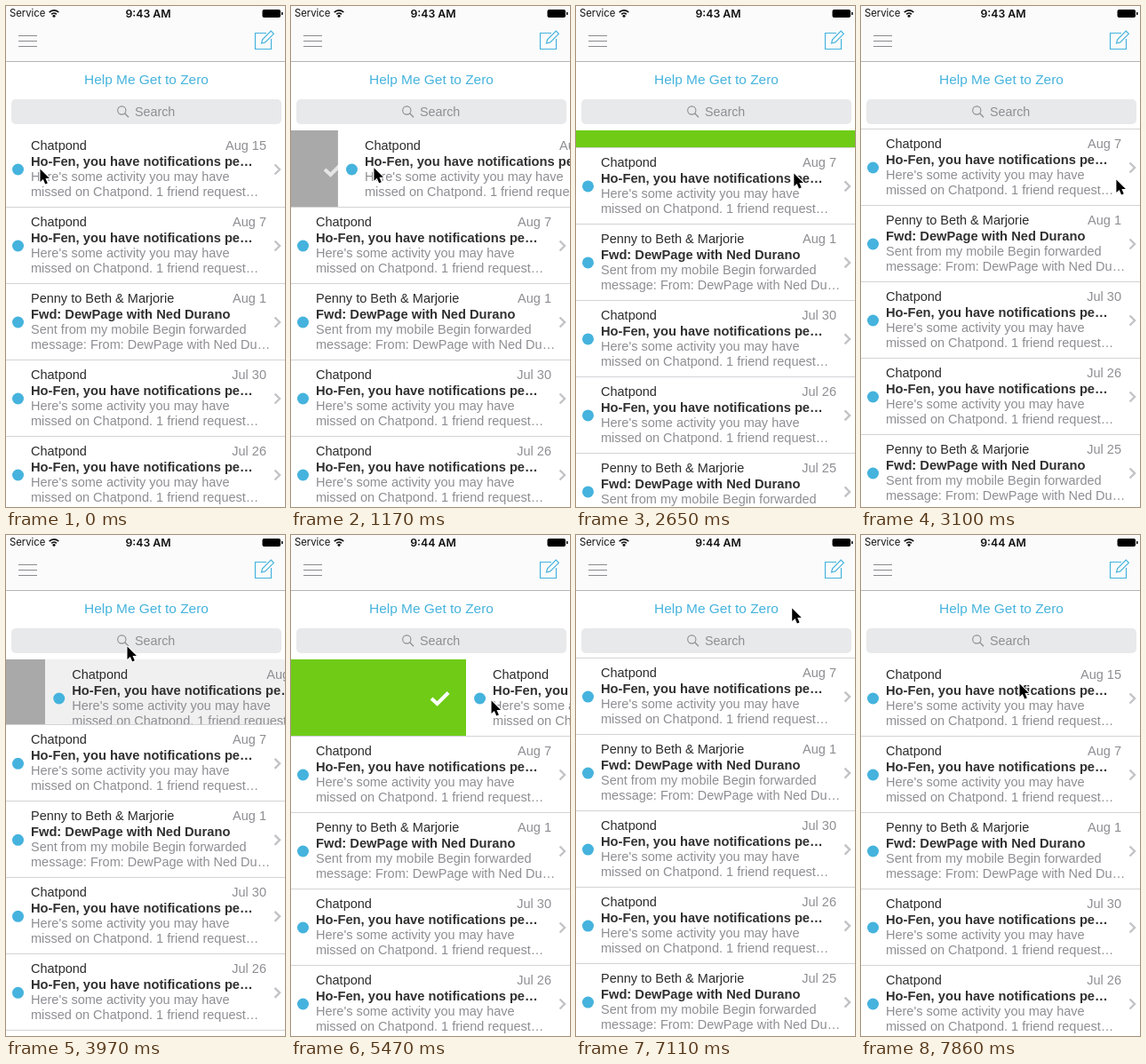
Write an HTML page with a canvas that moves like this. It is 314 px wide and 564 px high and loops after 8000 ms.

```html
<!DOCTYPE html>
<html lang="en">
<head>
<meta charset="utf-8">
<title>Inbox swipe</title>
<style>
  html, body { margin: 0; width: 100%; height: 100%; overflow: hidden; background: #fff; }
  canvas { display: block; width: 314px; height: 564px; }
</style>
</head>
<body>
<canvas id="stage"></canvas>
<script>
const W = 314, H = 564, LOOP = 8000, TOP = 140, ROW = 86;
const BLUE = '#45b3dd', GREY = '#8e8e93', LINE = '#d3d3d6';
const SANS = '"Liberation Sans", Arial, sans-serif';
const UI = 'Inter, Roboto, sans-serif';

const canvas = document.getElementById('stage');
const ctx = canvas.getContext('2d');
const dpr = window.devicePixelRatio || 1;
canvas.width = W * dpr;
canvas.height = H * dpr;

const notice = {
  from: 'Chatpond',
  subject: 'Ho-Fen, you have notifications pe…',
  body: ["Here's some activity you may have", 'missed on Chatpond. 1 friend request…']
};
const forward = {
  from: 'Penny to Beth & Marjorie',
  subject: 'Fwd: DewPage with Ned Durano',
  body: ['Sent from my mobile Begin forwarded', 'message: From: DewPage with Ned Du…']
};
const mails = [
  [notice, 'Aug 15'], [notice, 'Aug 7'], [forward, 'Aug 1'],
  [notice, 'Jul 30'], [notice, 'Jul 26'], [forward, 'Jul 25']
];

// Time, then value(s); linear between entries.
const dragKeys = [
  [0, 0], [290, 4], [2050, 126], [2200, 165], [2370, 316],
  [4720, 0], [5462, 199], [5760, 234], [5910, 246], [6353, 288], [6440, 316]
];
const cursorKeys = [
  [0, 38, 183], [290, 42, 183], [2050, 164, 180], [2200, 203, 181], [3074, 287, 195],
  [3530, 165, 58], [3660, 140, 46], [3953, 136, 125], [4250, 26, 187],
  [4720, 26, 187], [5462, 225, 186], [6353, 315, 184], [6810, 322, 160],
  [7250, 200, 40], [7390, 185, 20], [7540, 182, 32], [7838, 178, 167]
];

// Each swipe: start, collapse and undo times.
const swipes = [
  { start: 0, collapse: 2370, undo: 3583 },
  { start: 4720, collapse: 6430, undo: 7180 }
];

const clamp = (v, a = 0, b = 1) => Math.min(b, Math.max(a, v));

function sample(keys, t, col = 1) {
  const i = keys.findIndex(k => k[0] > t);
  if (i < 0) return keys[keys.length - 1][col];
  if (i === 0) return keys[0][col];
  const a = keys[i - 1], b = keys[i];
  return a[col] + (b[col] - a[col]) * (t - a[0]) / (b[0] - a[0]);
}

// The screen refreshes about seven times a second.
function stepTime(t) {
  return t < 4720
    ? Math.floor(t / 146.4) * 146.4
    : 4720 + Math.floor((t - 4720) / 148.5) * 148.5;
}

function rowState(t) {
  const s = swipes[t < 4720 ? 0 : 1];
  if (t >= s.undo) {
    const rest = 1 - clamp((t - s.undo) / 600);
    return { x: 314 * rest * rest, h: ROW * (1 - rest * rest), undo: rest };
  }
  if (t >= s.collapse) {
    const p = (t - s.collapse) / 500;
    const h = p < 1 ? ROW * (1 - p) ** 2 : -2 * Math.sin(Math.PI * clamp((p - 1) / 0.8));
    return { x: 316, h, undo: -1 };
  }
  return { x: sample(dragKeys, t), h: ROW, undo: -1 };
}

function text(str, x, y, font, color, align = 'left') {
  ctx.font = font;
  ctx.fillStyle = color;
  ctx.textAlign = align;
  ctx.fillText(str, x, y);
}

function rect(x, y, w, h, color) {
  ctx.fillStyle = color;
  ctx.fillRect(x, y, w, h);
}

function path(points, color, width, closed) {
  ctx.beginPath();
  points.forEach(([x, y]) => ctx.lineTo(x, y));
  if (closed) ctx.closePath();
  ctx.strokeStyle = color;
  ctx.lineWidth = width;
  ctx.stroke();
}

function disc(x, y, r, color) {
  ctx.beginPath();
  ctx.arc(x, y, r, 0, 7);
  ctx.fillStyle = color;
  ctx.fill();
}

function statusBar(t) {
  text('Service', 4, 12, '11.3px ' + UI, '#111');
  ctx.strokeStyle = '#111';
  ctx.lineWidth = 1.7;
  for (const r of [3.8, 7.2]) {
    ctx.beginPath();
    ctx.arc(54, 12, r, -Math.PI * 0.76, -Math.PI * 0.24);
    ctx.stroke();
  }
  disc(54, 11.3, 1.5, '#111');
  text(t < 5000 ? '9:43 AM' : '9:44 AM', 160, 12.5, '600 12.3px ' + UI, '#111', 'center');
  ctx.beginPath();
  ctx.roundRect(288.5, 4, 20.5, 9, 2);
  ctx.fillStyle = '#000';
  ctx.fill();
  rect(310, 7, 1.5, 3, '#000');
}

function header(t) {
  rect(0, 0, W, 62, '#fbfbfb');
  rect(0, 62, W, 1, '#b4b4b6');
  statusBar(t);
  for (const y of [33, 39, 45]) rect(14, y, 21, 1, '#8b8b8f');
  path([[293, 30.5], [280.5, 30.5], [280.5, 48.5], [298.5, 48.5], [298.5, 37]], BLUE, 1.2);
  path([[287.5, 42], [288.6, 37.8], [298.2, 28.2], [301.3, 31.3], [291.7, 40.9]], BLUE, 1.2, true);

  text('Help Me Get to Zero', 158, 88, '15.45px ' + SANS, BLUE, 'center');
  ctx.beginPath();
  ctx.roundRect(6, 105, 304, 28, 5);
  ctx.fillStyle = '#e8e9eb';
  ctx.fill();
  ctx.beginPath();
  ctx.arc(130.3, 117.5, 4.6, 0, 7);
  ctx.strokeStyle = GREY;
  ctx.lineWidth = 1.1;
  ctx.stroke();
  path([[133.6, 120.8], [138, 125.2]], GREY, 1.3);
  text('Search', 145, 124, '14.3px ' + SANS, GREY);
}

function mailRow([mail, date], x, y) {
  disc(x + 13.5, y + 44, 6.5, BLUE);
  text(mail.from, x + 28, y + 22, '14.5px ' + SANS, '#2b2b2b');
  text(date, x + 293, y + 22, '14.5px ' + SANS, GREY, 'right');
  text(mail.subject, x + 28, y + 40, 'bold 14.7px ' + SANS, '#303030');
  mail.body.forEach((line, i) =>
    text(line, x + 28, y + 57 + 17 * i, '14.5px ' + SANS, GREY));
  path([[x + 302.5, y + 38.5], [x + 308, y + 44], [x + 302.5, y + 49.5]], '#c3c3c7', 2.4);
}

function swipePanel(row, t) {
  const isRed = t > 4720 && row.x >= 235;
  const isGrey = row.undo >= 0 || row.x < 79;
  rect(0, TOP, row.x - 2, ROW, isGrey ? '#a9a9a9' : isRed ? '#ff0000' : '#70cb17');
  if (row.undo >= 0) return;

  const cx = Math.max(row.x, 79) - 31.5, cy = TOP + 44;
  ctx.globalAlpha = clamp(row.x / 79);
  if (isRed) {
    path([[cx - 8, cy - 8], [cx + 8, cy + 8]], '#fff', 4);
    path([[cx + 8, cy - 8], [cx - 8, cy + 8]], '#fff', 4);
  } else {
    path([[cx - 9.5, cy], [cx - 3, cy + 6], [cx + 9.5, cy - 6.5]], '#fff', 4);
  }
  ctx.globalAlpha = 1;
}

function list(t) {
  const row = rowState(t);
  if (row.h > 0) {
    ctx.save();
    ctx.beginPath();
    ctx.rect(0, TOP, W, row.h);
    ctx.clip();
    if (row.x > 2) swipePanel(row, t);
    rect(Math.max(0, row.x - 2), TOP, W, ROW, '#fff');
    if (row.undo > 0) {
      rect(row.x - 2, TOP, W, ROW, `rgba(0,0,0,${0.15 * row.undo})`);
    }
    mailRow(mails[0], row.x, TOP);
    ctx.restore();
  }
  const top = TOP + row.h;
  mails.slice(1).forEach((mail, i) => {
    rect(0, Math.round(top) + i * ROW, W, 1, LINE);
    mailRow(mail, 0, top + i * ROW);
  });
  rect(0, Math.round(top) + 5 * ROW, W, 1, LINE);
}

function cursor(t) {
  ctx.save();
  ctx.translate(sample(cursorKeys, t, 1), sample(cursorKeys, t, 2));
  ctx.lineJoin = 'round';
  path([[0.5, 0.5], [0.5, 15], [3.8, 12], [6.2, 17.5], [8.8, 16.4], [6.5, 11], [11, 11]], '#fff', 2, true);
  ctx.fillStyle = '#000';
  ctx.fill();
  ctx.restore();
}

function draw(now) {
  const t = stepTime(now % LOOP);
  ctx.setTransform(dpr, 0, 0, dpr, 0, 0);
  rect(0, 0, W, H, '#fff');
  list(t);
  header(t);
  cursor(t);
}

let begin;
function tick(now) {
  begin ??= now;
  draw(now - begin);
  requestAnimationFrame(tick);
}
draw(0);
requestAnimationFrame(tick);
</script>
</body>
</html>
```
